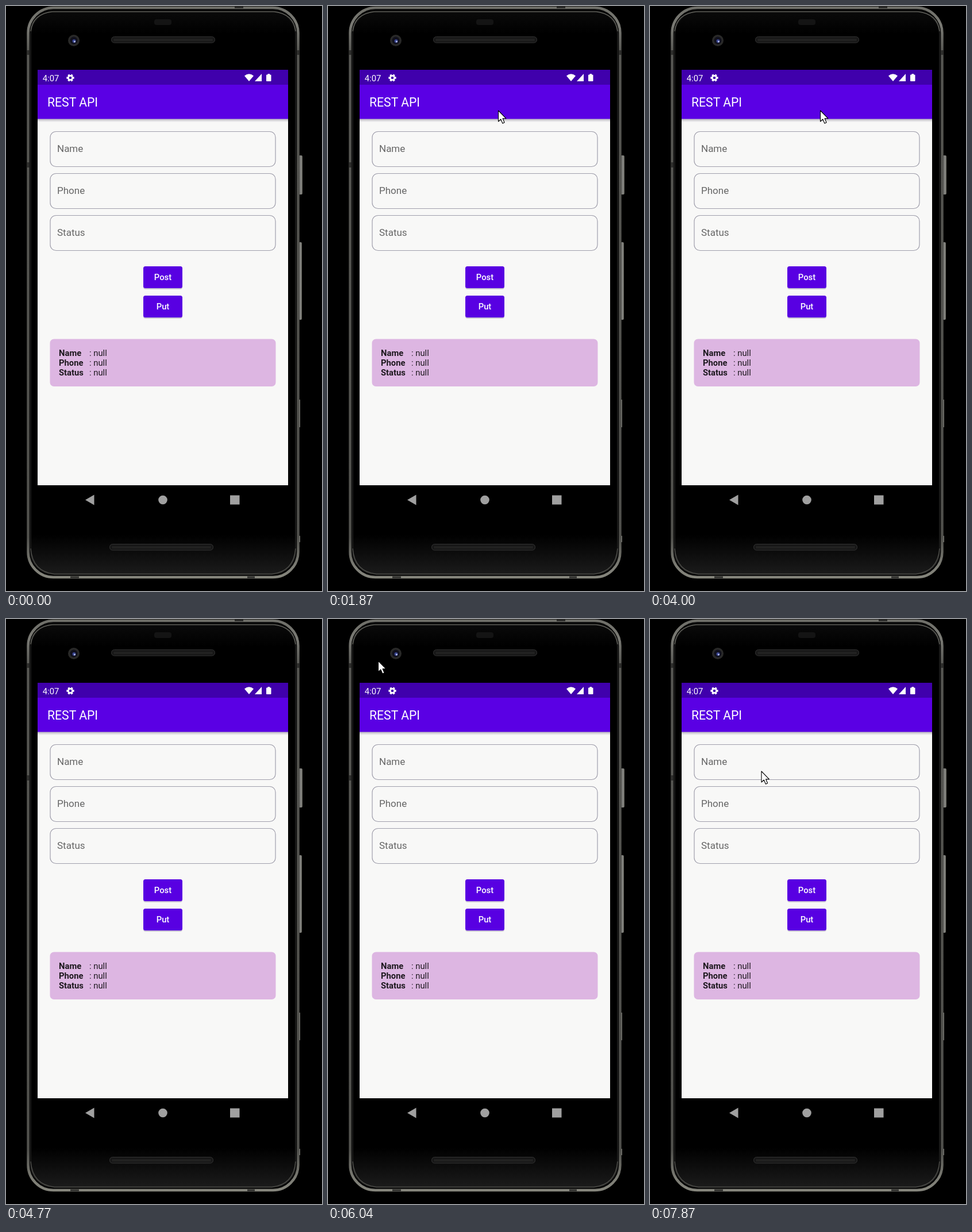
An HTML page that plays this animation: 550 px wide and 1018 px high, repeating every 8 s.

```html
<!DOCTYPE html>
<html lang="en">
<head>
<meta charset="utf-8">
<title>Phone form</title>
<style>
  html, body { margin: 0; width: 100%; height: 100%; overflow: hidden; background: #000; }
  svg { display: block; width: 100%; height: 100%; }
  text { font-family: Roboto, "Noto Sans", sans-serif; }
  .hint { font-size: 17px; fill: #666; }
  .btn { font-size: 14.8px; font-weight: 500; fill: #fff; text-anchor: middle; }
  .row { font-size: 14.8px; fill: #1d181e; }
  .key { font-weight: 700; }
</style>
</head>
<body>
<svg viewBox="0 0 550 1018">
  <defs>
    <linearGradient id="rim" x1="0" y1="0" x2="0" y2="1">
      <stop offset="0" stop-color="#6e6e68"/>
      <stop offset=".03" stop-color="#7a7a74"/>
      <stop offset=".08" stop-color="#555551"/>
      <stop offset=".93" stop-color="#50504c"/>
      <stop offset=".98" stop-color="#7c7c74"/>
      <stop offset="1" stop-color="#85857c"/>
    </linearGradient>
    <linearGradient id="glass" x1="0" y1="0" x2="0" y2="1">
      <stop offset="0" stop-color="#0a0a0a"/>
      <stop offset=".04" stop-color="#000"/>
      <stop offset=".93" stop-color="#000"/>
      <stop offset="1" stop-color="#1b1b1b"/>
    </linearGradient>
    <linearGradient id="key">
      <stop offset="0" stop-color="#4a4a48"/>
      <stop offset=".6" stop-color="#8a8a86"/>
      <stop offset="1" stop-color="#66665f"/>
    </linearGradient>
    <linearGradient id="shade" x1="0" y1="0" x2="0" y2="1">
      <stop offset="0" stop-color="#b2afba"/>
      <stop offset="1" stop-color="#f8f8f7"/>
    </linearGradient>
  </defs>
  <rect width="550" height="1018"/>

  <!-- body and side keys -->
  <g fill="url(#key)">
    <rect x="509" y="260" width="7" height="68" rx="2"/>
    <rect x="509" y="411" width="6" height="135" rx="2"/>
    <rect x="509" y="685" width="3" height="48"/>
    <rect x="509" y="922" width="3" height="11"/>
  </g>
  <rect x="38.5" y="3" width="470" height="991" rx="44" fill="#060606" stroke="url(#rim)" stroke-width="4.5"/>
  <rect x="43" y="9.500" width="461" height="979" rx="40" fill="url(#glass)" stroke="#232322" stroke-width="1.5"/>
  <path d="M43 44Q46 14 80 10H467Q501 14 504 44" fill="none" stroke="#77776f" stroke-width="1.2"/>
  <path d="M43 944Q46 984 84 988.500H463Q501 984 504 944" fill="none" stroke="#4c4c48" stroke-width="1.5"/>
  <g fill="#2b2b29">
    <rect x="36.500" y="77" width="4" height="8"/><rect x="36.500" y="272" width="4" height="9"/>
    <rect x="506.500" y="77" width="4" height="8"/>
    <rect x="398" y="1" width="15" height="3"/>
    <rect x="112" y="992.500" width="15" height="3"/><rect x="420" y="992.500" width="13" height="3"/>
  </g>
  <rect x="258" y="23" width="30" height="10" rx="4" fill="#141414"/>
  <g fill="#171717" stroke="#333">
    <rect x="183.5" y="53.5" width="180" height="10.500" rx="5"/>
    <rect x="180.5" y="936.5" width="180" height="10.500" rx="5"/>
  </g>
  <path d="M188 59H360M185 942H357" stroke="#2b2b2a" stroke-width="4" stroke-dasharray="1 1"/>
  <circle cx="118" cy="60" r="10" fill="#292928"/>
  <circle cx="118" cy="60" r="6.500" fill="#10101c"/>
  <circle cx="118.500" cy="61" r="3" fill="#3a4692"/>
  <circle cx="119.500" cy="62" r="1.400" fill="#c2ccf2"/>

  <!-- app screen -->
  <rect x="55" y="111" width="436" height="723" fill="#f8f8f7"/>
  <rect x="55" y="196" width="436" height="6" fill="url(#shade)"/>
  <rect x="55" y="111" width="436" height="26" fill="#4000ac"/>
  <rect x="55" y="137" width="436" height="59.500" fill="#5a00e4"/>
  <text x="63.800" y="130.500" font-size="14.8" fill="#fff">4:07</text>
  <g transform="translate(112 125)">
    <circle r="5" fill="#fff"/>
    <path id="cogs" stroke="#fff" stroke-width="3.400"/>
    <circle r="2.300" fill="#4000ac"/>
  </g>
  <g fill="#fff">
    <path d="M415 121.500Q423 115 431 121.500L423 131Z"/>
    <path d="M433 131L445 118V131Z"/>
    <path d="M453 120.500Q453 119.500 454 119.500H455.500V118H459V119.500H460.500Q461.500 119.500 461.500 120.500V130Q461.500 131 460.500 131H454Q453 131 453 130Z"/>
  </g>
  <text x="72" y="174.500" font-size="21.200" fill="#fff">REST API</text>
  <g id="form"></g>

  <!-- navigation bar -->
  <g fill="#a0a0a0">
    <path d="M138 859.500L153.500 850.500V868.500Z"/>
    <circle cx="273" cy="859.500" r="7.800"/>
    <rect x="390" y="851.500" width="16.500" height="16"/>
  </g>

  <path id="cursor" d="M0 0V19L4.300 15L7.400 22.200L10.600 20.800L7.600 13.800H13.500Z" fill="#fff" stroke="#000" stroke-width="1.1" stroke-linejoin="round"/>
</svg>
<script>
  const LOOP = 8000;
  const byId = id => document.getElementById(id);
  const labels = ["Name", "Phone", "Status"];

  const field = (label, i) => {
    const y = 218.5 + 73 * i;
    return `<rect x="77" y="${y}" width="392" height="61" rx="10" fill="none" stroke="#a09fac" stroke-width="1.2"/>
      <text class="hint" x="89" y="${y + 35.5}">${label}</text>`;
  };
  const button = (label, y) =>
    `<rect x="239" y="${y + 2}" width="68" height="38" rx="4" fill="#c9c6d2"/>
     <rect x="239" y="${y}" width="68" height="38" rx="3.5" fill="#5800e2"/>
     <text class="btn" x="273" y="${y + 24}">${label}</text>`;
  const row = (label, i) => {
    const y = 609 + 17 * i;
    return `<text class="row key" x="92" y="${y}">${label}</text>
      <text class="row" x="145" y="${y}">: null</text>`;
  };

  byId("form").innerHTML = labels.map(field).join("")
    + button("Post", 453) + button("Put", 504)
    + '<rect x="76.5" y="579.5" width="393" height="82.5" rx="7" fill="#ddb6e2"/>'
    + labels.map(row).join("");

  byId("cogs").setAttribute("d", [0, 60, 120].map(deg => {
    const a = deg * Math.PI / 180, x = 6.6 * Math.cos(a), y = 6.6 * Math.sin(a);
    return `M${-x} ${-y}L${x} ${y}`;
  }).join(""));

  // Pointer stops: time, x, y; a repeated place is a rest.
  const stops = [
    [0, 340, -30], [300, 340, -30], [860, 296.5, 182], [4230, 296.5, 182],
    [4740, 215, -30], [4900, 215, -30], [4901, -20, 135], [5100, -20, 135],
    [5540, 84.5, 90], [5900, 87.5, 73], [7869, 87.5, 73], [7870, 194, 265], [LOOP, 194, 265]
  ];
  const ease = p => p * p * (3 - 2 * p);

  function draw(time) {
    const t = time % LOOP;
    const i = stops.findIndex(s => s[0] > t);
    const [t0, x0, y0] = stops[i - 1], [t1, x1, y1] = stops[i];
    const p = ease((t - t0) / (t1 - t0));
    const x = x0 + (x1 - x0) * p, y = y0 + (y1 - y0) * p;
    byId("cursor").setAttribute("transform", `translate(${x.toFixed(1)} ${y.toFixed(1)})`);
  }

  const start = performance.now();
  function tick() {
    draw(performance.now() - start);
    requestAnimationFrame(tick);
  }
  tick();
</script>
</body>
</html>
```
